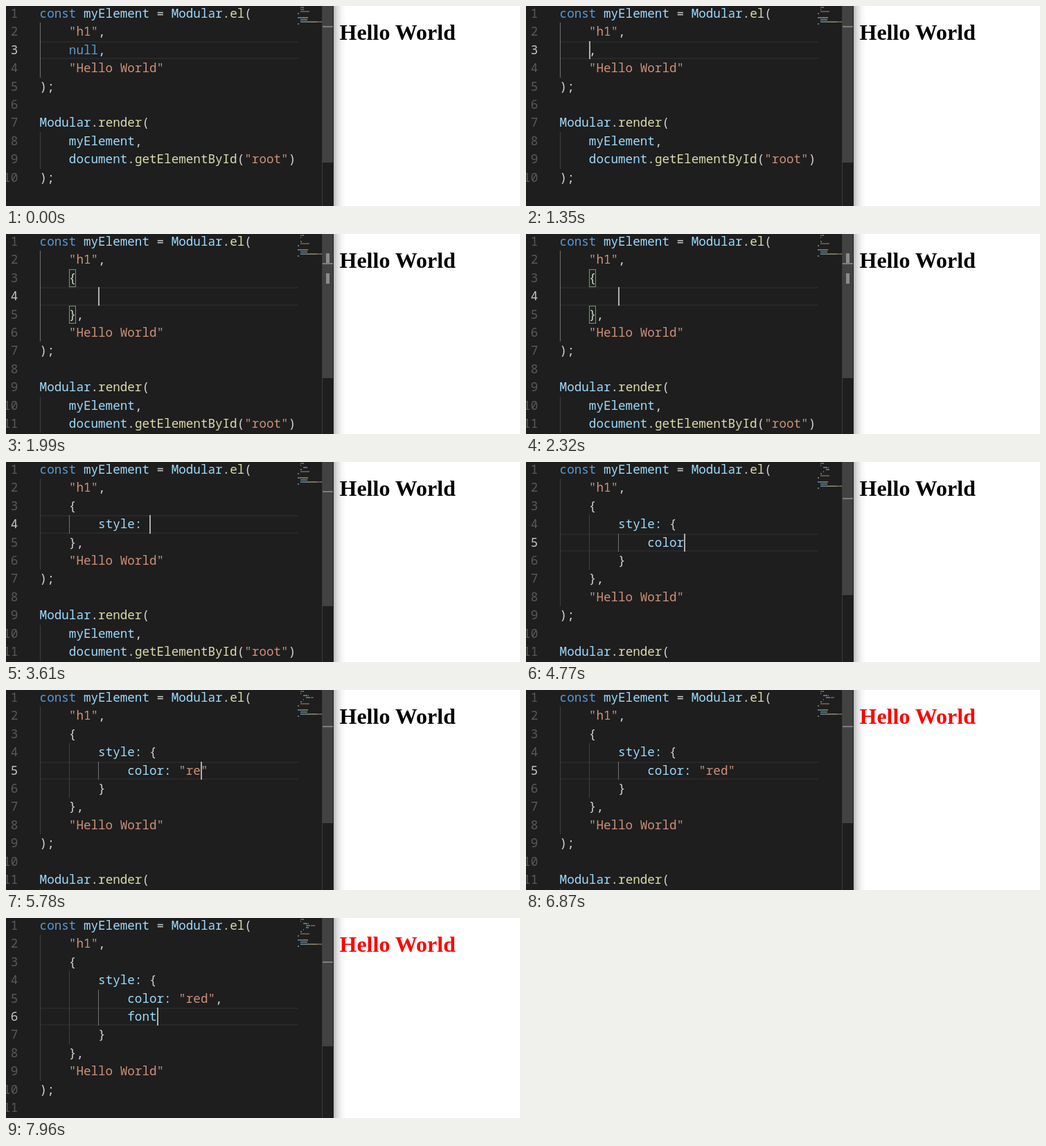
An HTML page for the animation above (8000 ms loop, 742 by 290 pixels).

```html
<!DOCTYPE html>
<html lang="en">
<head>
<meta charset="utf-8">
<title>Live code editor</title>
<style>
  html, body { margin: 0; width: 100%; height: 100%; overflow: hidden; background: #fff; }
  svg { display: block; width: 742px; height: 290px; }
  .code text { font: 17.6px "Noto Sans Mono", "DejaVu Sans Mono", monospace; font-variant-ligatures: none; white-space: pre; }
  .page { font: bold 32px "Liberation Serif", "Times New Roman", serif; }
</style>
</head>
<body>
<svg viewBox="0 0 742 290">
  <defs>
    <linearGradient id="shade">
      <stop offset="0" stop-color="#bcbcbc"/>
      <stop offset=".3" stop-color="#dedede"/>
      <stop offset=".65" stop-color="#f6f6f6"/>
      <stop offset="1" stop-color="#fff"/>
    </linearGradient>
  </defs>
  <rect width="742" height="290" fill="#fff"/>
  <rect x="473" width="18" height="290" fill="url(#shade)"/>
  <text id="heading" class="page" x="481.5" y="49">Hello World</text>
  <rect width="473" height="290" fill="#1e1e1e"/>
  <g id="editor" class="code"></g>
</svg>
<script>
(() => {
const LOOP = 8000;
const LEFT = 48.6, CHAR = 10.56, LINE = 26.4;   // text grid
const VIEW = 374;                               // editor height incl. hidden part
const MAP_X = 421;

const head = ['const myElement = Modular.el(', '    "h1",'];
const tail = ['    "Hello World"', ');', '', 'Modular.render(', '    myElement,',
  '    document.getElementById("root")', ');'];

const outer = s => `    {\n${s}\n    },`;
const inner = s => outer(`        style: {\n${s}\n        }`);
const colorLine = s => inner('            ' + s);
const fontLine = s => colorLine('color: "red",\n            ' + s);

// [time, edited lines, mark]; "|" is a visible cursor, "¦" a hidden one
const steps = [
  [0, '    null,¦'],
  [40, '    null,|'],
  [290, '    null|,'],
  [460, '    null|,', 'word'],
  [630, '    null¦,', 'word'],
  [800, '|,'],
  [1140, '    |,'],
  [1520, '    {|},', 'pair'],
  [1860, outer('        |'), 'pair'],
  [2360, outer('        |')],
  ...typed('style', [2650, 2820, 2950, 3070, 3240], s => outer('        ' + s)),
  [3480, outer('        style:|')],
  [3610, outer('        style: |')],
  [3860, outer('        style: {|}'), 'pair'],
  [4020, colorLine('|'), 'pair'],
  ...typed('color', [4310, 4440, 4560, 4650, 4770], colorLine),
  [4940, colorLine('color:|')],
  [5070, colorLine('color: |')],
  [5280, colorLine('color: "|"')],
  ...typed('red', [5530, 5660, 5820], s => colorLine(`color: "${s}"`)),
  [6200, colorLine('color: "red¦"')],
  [6530, colorLine('color: "red|"')],
  [6870, colorLine('color: "red¦"')],
  [7000, colorLine('color: "red"|')],
  [7290, colorLine('color: "red",|')],
  [7420, fontLine('|')],
  ...typed('font', [7760, 7840, 7920, 7960], fontLine)
];

function typed(word, times, wrap) {
  return times.map((t, i) => [t, wrap(word.slice(0, i + 1) + '|')]);
}

const colX = c => LEFT + c * CHAR;
const rowY = i => Math.round(-2 + i * LINE);
const rect = (x, y, w, h, fill, more = '') =>
  `<rect x="${x}" y="${y}" width="${w}" height="${h}" fill="${fill}" ${more}/>`;
const text = (x, y, s, fill, more = '') =>
  `<text x="${x}" y="${y}" fill="${fill}" ${more}>${s}</text>`;

function tokens(line) {
  const kinds = /("[^"]*"?)|(\b(?:const|null)\b)|(\w+(?=\())|(\w+:?)|([^\s\w"]+)/g;
  const fills = ['#ce9178', '#569cd6', '#dcdcaa', '#9cdcfe', '#d4d4d4'];
  return [...line.matchAll(kinds)].map(m => ({
    col: m.index, s: m[0], fill: fills[m.slice(1).findIndex(Boolean)]
  }));
}

// Blank lines take the depth of the line above
function depths(lines) {
  const out = [];
  lines.forEach((l, i) => {
    const n = l.search(/\S/);
    out.push(n >= 0 ? n / 4 : l ? out[i - 1] : 0);
  });
  return out;
}

function guides(lines, row) {
  const depth = depths(lines), level = depth[row];
  let from = row, to = row;
  while (level && depth[from - 1] >= level) from--;
  while (level && depth[to + 1] >= level) to++;
  return depth.map((d, i) => Array.from({ length: d }, (_, k) => {
    const active = k === level - 1 && i >= from && i <= to;
    return rect(Math.round(colX(k * 4)), rowY(i), 1, rowY(i + 1) - rowY(i), active ? '#707070' : '#404040');
  }).join('')).join('');
}

function marks(lines, kind) {
  if (kind === 'word') return [{ row: 2, col: 4, len: 4 }];
  if (kind !== 'pair') return [];
  const opening = lines.findLastIndex(l => l.includes('{'));
  const closing = lines.findIndex(l => l.includes('}'));
  return [
    { row: opening, col: lines[opening].indexOf('{'), len: 1 },
    { row: closing, col: lines[closing].indexOf('}'), len: 1 }
  ];
}

function drawMark(m, kind) {
  const x = Math.round(colX(m.col)), y = rowY(m.row);
  const w = Math.round(colX(m.col + m.len)) - x, h = rowY(m.row + 1) - y;
  return kind === 'word'
    ? rect(x, y, w, h, '#575757', 'fill-opacity=".72"')
    : rect(x + .5, y + .5, w - 1, h - 1, '#1b251b', 'stroke="#888"');
}

function draw([, mid, kind]) {
  const raw = [...head, ...mid.split('\n'), ...tail];
  const row = raw.findIndex(l => /[|¦]/.test(l));
  const col = raw[row].search(/[|¦]/);
  const lines = raw.map(l => l.replace(/[|¦]/, ''));
  const found = marks(lines, kind);
  const y = rowY(row), h = rowY(row + 1) - y;
  const total = VIEW + (lines.length - 1) * LINE;
  const rulerY = i => -2 + i * LINE * VIEW / total;

  let out = rect(49, y, 373, 2, '#282828') + rect(49, y + h - 2, 373, 2, '#282828');
  out += guides(lines, row);
  out += found.map(m => drawMark(m, kind)).join('');
  lines.forEach((line, i) => {
    const base = rowY(i) + 19;
    out += text(17.2, base, i + 1, i === row ? '#c6c6c6' : '#5a5a5a', 'text-anchor="end"');
    for (const t of tokens(line)) {
      out += text(colX(t.col), base, t.s, t.fill);
      out += rect(MAP_X + t.col, -2 + i * 3, t.s.length, 2, t.fill, 'opacity=".45"');
    }
  });
  if (mid.includes('|')) out += rect(Math.round(colX(col)), y, 2, h, '#aeafad');

  // Overview ruler and scrollbar
  out += rect(456, 0, 1, 290, '#3b3b3b');
  out += rect(457, 0, 15, Math.round(VIEW * VIEW / total - 2), '#424242');
  out += found.map(m => rect(462, Math.round(rulerY(m.row)), 5,
    Math.round(LINE * VIEW / total), '#8c8c8c')).join('');
  out += rect(457, Math.round(rulerY(row)) - 1, 15, 2, '#7e7e7e');
  return out;
}

const editor = document.getElementById('editor');
const heading = document.getElementById('heading');
let shown = null;

function render(t) {
  const step = steps.findLast(s => s[0] <= t);
  if (step === shown) return;
  shown = step;
  editor.innerHTML = draw(step);
  heading.setAttribute('fill', t >= 6200 ? '#f00' : '#000');
}

const start = performance.now();
function tick() {
  render(Math.max(0, performance.now() - start) % LOOP);
  requestAnimationFrame(tick);
}
tick();
})();
</script>
</body>
</html>
```
